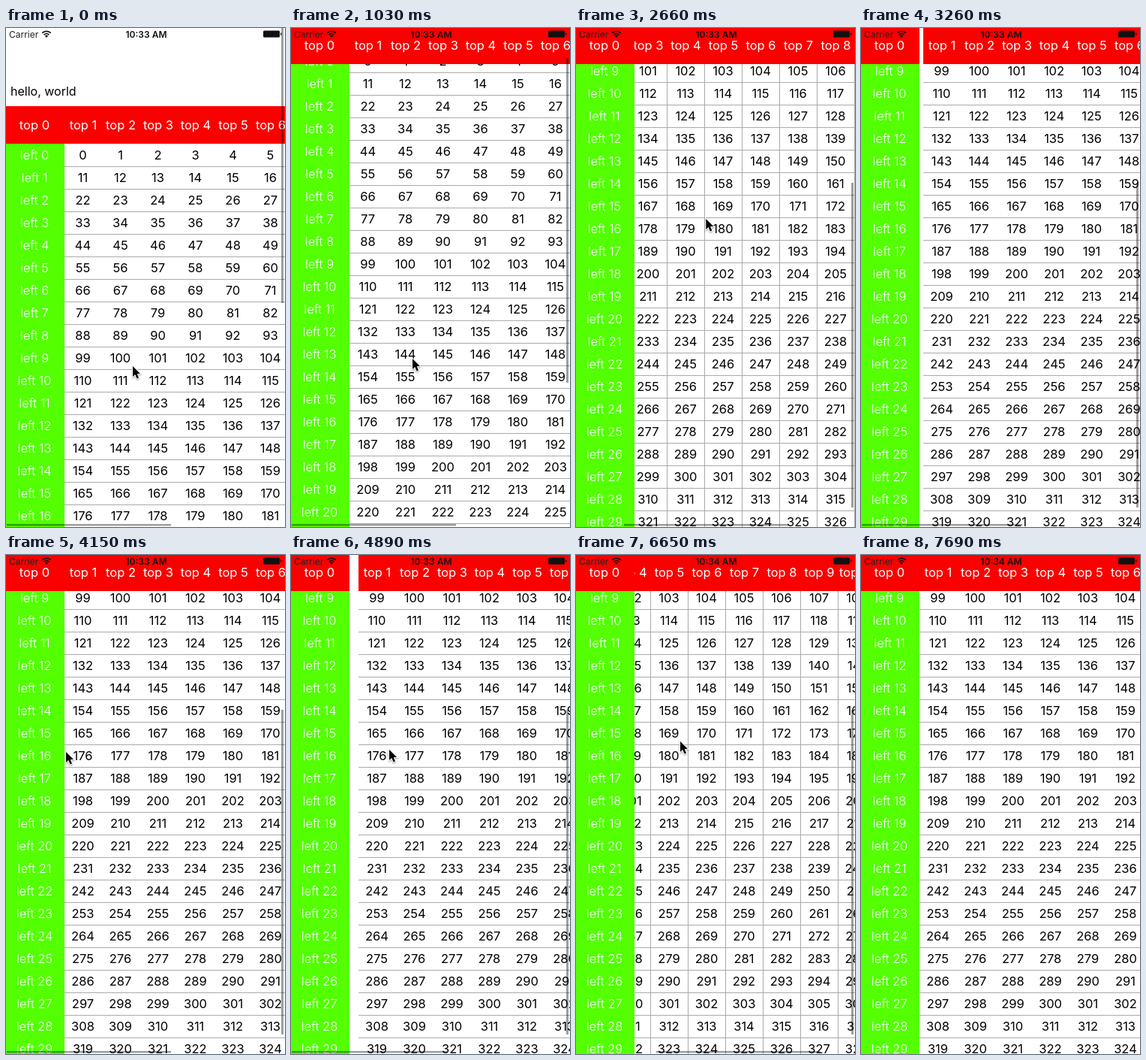
Recreate the animation shown at these times as an HTML page with a canvas. Size 372 by 664 pixels, loop 8300 ms.

```html
<!DOCTYPE html>
<html lang="en">
<head>
<meta charset="utf-8">
<title>Sticky table scroll</title>
<style>
html, body { margin: 0; width: 100%; height: 100%; overflow: hidden; background: #fff; }
canvas { display: block; }
</style>
</head>
<body>
<canvas id="stage" width="372" height="664"></canvas>
<script>
const W = 372, H = 664, LOOP = 8300, STEP = 147.8;
const LEFT = 78, COL = 50, ROW = 30, COLS = 11;
const RED = '#fa0000', GREEN = '#53ff00', FONT = 'Inter, "Liberation Sans", sans-serif';
const ctx = document.getElementById('stage').getContext('2d');

// Keys: [step, value, ...]
const scrollY = [[0, 0], [1, 12], [4, 112], [5, 125], [7, 125], [12, 321.5], [13, 360], [14, 382]];
const scrollX = [[15, 0], [16, 20], [19, 150], [20, 150], [22, -5], [23, -20], [24, -9], [26, 0],
  [28, 0], [30, -40], [31, -40], [33, -12], [35, 0], [36, 0], [41, 165], [43, 178.5],
  [45, 178.5], [48, 10], [49, -25], [50, -14], [52, 0]];
const pointer = [[0, 169, 450], [4, 172, 338], [7, 162, 440], [12, 182, 252], [14, 184, 246],
  [16, 260, 252], [19, 130, 255], [20, 140, 255], [22, 390, 255], [27, 390, 262],
  [28, 80, 262], [31, 150, 260], [33, 131, 259], [36, 290, 258], [41, 115, 250],
  [45, 139, 248], [48, 390, 246]];

function at(keys, k) {
  const i = keys.findIndex(key => key[0] > k);
  if (i < 0) return keys[keys.length - 1].slice(1);
  if (i === 0) return keys[0].slice(1);
  const a = keys[i - 1], b = keys[i], f = (k - a[0]) / (b[0] - a[0]);
  return a.slice(1).map((v, n) => v + (b[n + 1] - v) * f);
}

const halfPoint = v => Math.round(v * 2) / 2;
const isHalf = v => v % 1 !== 0;

function box(color, x, y, w, h) {
  ctx.fillStyle = color;
  ctx.fillRect(x, y, w, h);
}

function text(str, x, y, color, size = 16.5, weight = 400, align = 'center') {
  ctx.font = `${weight} ${size}px ${FONT}`;
  ctx.textAlign = align;
  ctx.fillStyle = color;
  ctx.fillText(str, x, y);
}

function clipped(x, y, w, h, draw) {
  ctx.save();
  ctx.beginPath();
  ctx.rect(x, y, w, h);
  ctx.clip();
  draw();
  ctx.restore();
}

function drawTable(sx, sy) {
  const head = Math.max(104 - sy, -2), top = head + 50;
  const first = Math.floor((top - 154 + sy) / ROW);
  const rowY = r => 154 - sy + r * ROW, colX = c => LEFT - sx + c * COL;

  text('hello, world', 6, 90 - sy, '#000', 16, 400, 'left');
  clipped(LEFT, top, W - LEFT, H - top, () => {
    for (let r = first; rowY(r) < H; r++) {
      for (let c = 0; c < COLS; c++) text(r * COLS + c, colX(c) + 24.5, rowY(r) + 21, '#000');
      if (!isHalf(sy)) box('#aaa', colX(0), rowY(r + 1), COLS * COL, 1);
    }
    if (isHalf(sx)) for (let c = 1; c <= COLS; c++) box('#aaa', Math.floor(colX(c)), top, 1, H - top);
  });
  box(GREEN, 0, top, LEFT, H - top);
  clipped(0, top, LEFT, H - top, () => {
    for (let r = first; rowY(r) < H; r++) text('left ' + r, 38, rowY(r) + 21, '#fff', 16.5, 300);
  });
  clipped(LEFT, head, W - LEFT, 50, () => {
    box('#fff', LEFT, head, W, 50);
    box(RED, colX(0), head, COLS * COL, 50);
    for (let c = 0; c < COLS; c++) text('top ' + (c + 1), colX(c) + 25, head + 31, '#fff');
  });
  box(RED, 0, head, LEFT, 50);
  text('top 0', 38, head + 31, '#fff');
}

function drawBars(sx, sy) {
  const f = Math.min(sy / 125, 1), gray = 'rgba(0,0,0,.38)';
  box(gray, 367, 40 * f + Math.max(sy - 125, 0) * .646, 3, 366 + 66 * f);
  box(gray, 1 + Math.max(sx, 0) * .592, 660, 219 + Math.min(sx, 0), 2.5);
}

function drawStatus(clock) {
  text('Carrier', 4, 12.5, '#222', 12, 400, 'left');
  text(clock, 187, 12.5, '#111', 12, 600);
  ctx.strokeStyle = ctx.fillStyle = '#111';
  ctx.lineWidth = 1.7;
  for (const r of [4.8, 8.2]) {
    ctx.beginPath();
    ctx.arc(54, 12.5, r, -Math.PI * .75, -Math.PI * .25);
    ctx.stroke();
  }
  ctx.beginPath();
  ctx.moveTo(54, 12.8);
  ctx.arc(54, 12.8, 3, -Math.PI * .75, -Math.PI * .25);
  ctx.fill();
  ctx.beginPath();
  ctx.roundRect(343, 3.5, 22, 9, 1.5);
  ctx.fill();
  box('#111', 366, 6.5, 1.3, 3);
}

function drawPointer(x, y) {
  ctx.save();
  ctx.translate(x, y);
  ctx.beginPath();
  [[0, 0], [0, 14], [3.2, 11], [5.6, 16.5], [8, 15.5], [5.7, 10.2], [10, 10]]
    .forEach(p => ctx.lineTo(...p));
  ctx.closePath();
  ctx.lineWidth = 2;
  ctx.strokeStyle = '#fff';
  ctx.shadowColor = 'rgba(0,0,0,.4)';
  ctx.shadowBlur = 2;
  ctx.shadowOffsetY = 1;
  ctx.stroke();
  ctx.shadowColor = 'transparent';
  ctx.fillStyle = '#000';
  ctx.fill();
  ctx.restore();
}

function render(now) {
  // The screen refreshes in coarse steps and rests after the last one
  const k = Math.min(Math.floor((now % LOOP + 8) / STEP), 52);
  const sx = halfPoint(at(scrollX, k)[0]), sy = halfPoint(at(scrollY, k)[0]);
  box('#fff', 0, 0, W, H);
  drawTable(sx, sy);
  if (k < 52 && k !== 26 && k !== 27) drawBars(sx, sy);
  drawStatus(k < 40 ? '10:33 AM' : '10:34 AM');
  drawPointer(...at(pointer, k));
}

const start = performance.now();
function tick() {
  render(performance.now() - start);
  requestAnimationFrame(tick);
}
tick();
</script>
</body>
</html>
```
